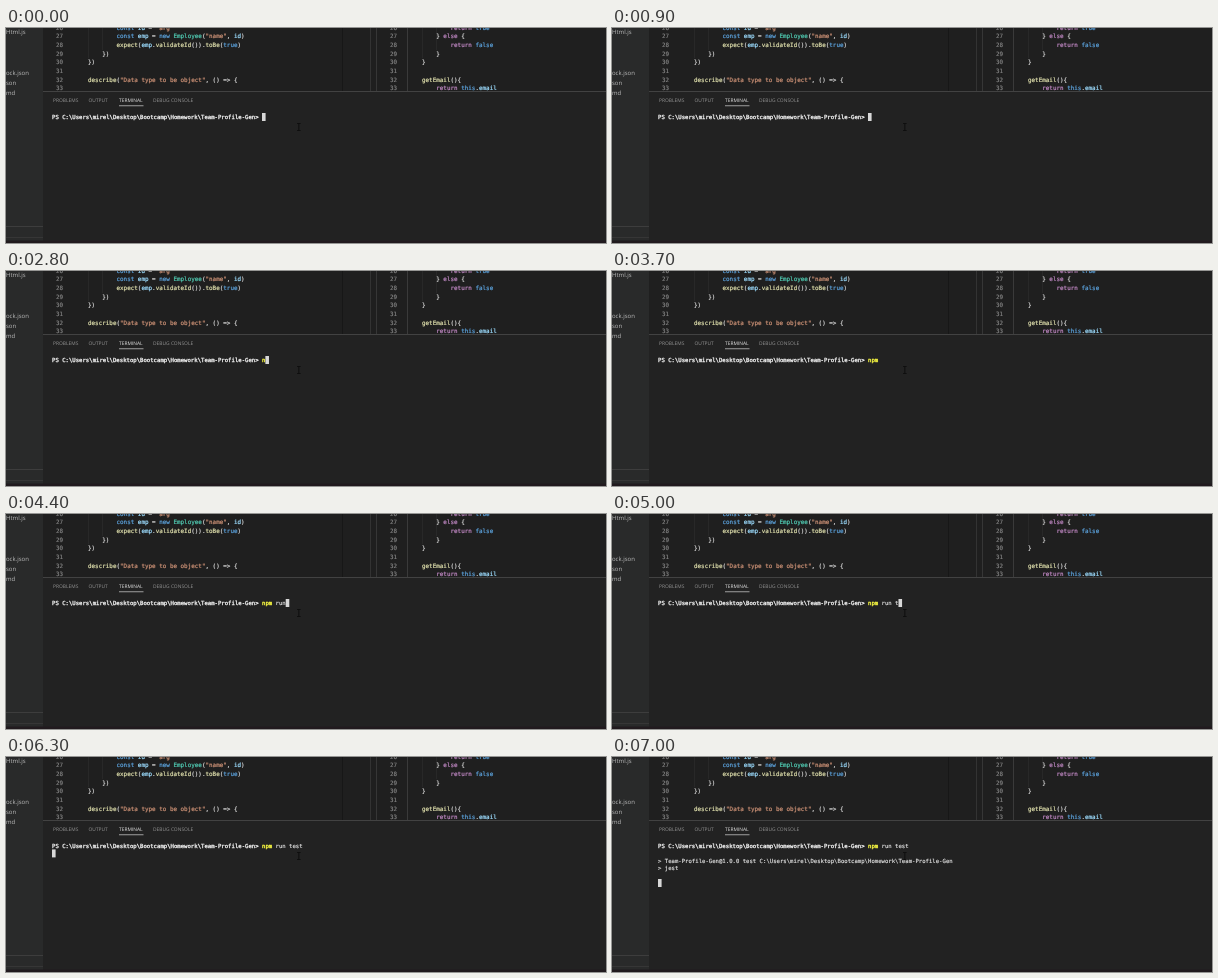
Write an HTML page with a canvas that moves like this. It is 600 px wide and 215 px high and loops after 8000 ms.

```html
<!DOCTYPE html>
<html lang="en">
<head>
<meta charset="utf-8">
<title>Terminal test run</title>
<style>
html, body { margin: 0; width: 100%; height: 100%; overflow: hidden; background: #222; }
canvas { display: block; }
</style>
</head>
<body>
<canvas id="stage" width="600" height="215"></canvas>
<script>
const ctx = document.getElementById('stage').getContext('2d');
const MONO = '"DejaVu Sans Mono", monospace';
const SANS = '"Open Sans", sans-serif';
const LOOP = 8000;
const PATH = 'C:\\Users\\mirel\\Desktop\\Bootcamp\\Homework\\Team-Profile-Gen';
const PROMPT = `PS ${PATH}> `;
const COMMAND = 'npm run test';
const KEY_TIMES = [2800, 3100, 3400, 3700, 4000, 4200, 4400, 4600, 4900, 5100, 5300, 5400];
const ENTER = 6000, OUTPUT = 7000;
const CELL = 3.387, ROW = 7.4, LEFT = 46, TOP = 89;
const CODE_CELL = 3.56, CODE_ROW = 8.65;

function rect(x, y, w, h, color) {
  ctx.fillStyle = color;
  ctx.fillRect(x, y, w, h);
}

// Glyphs are set ten times larger and scaled down for fractional positions.
function text(str, x, y, size, color, family = SANS, weight = 0) {
  ctx.save();
  ctx.translate(x, y);
  ctx.scale(0.1, 0.1);
  ctx.font = `${size * 10}px ${family}`;
  ctx.textRendering = 'geometricPrecision';
  ctx.fillStyle = ctx.strokeStyle = color;
  ctx.fillText(str, 0, size * 3.6);
  if (weight) {
    ctx.lineWidth = weight * 10;
    ctx.lineJoin = 'round';
    ctx.strokeText(str, 0, size * 3.6);
  }
  ctx.restore();
}

function mono(str, x, y, cell, color, weight) {
  [...str].forEach((ch, i) => {
    if (ch !== ' ') text(ch, x + i * cell, y, cell / 0.602, color, MONO, weight);
  });
}

function tokenColor(token, next) {
  if (token[0] === '"') return '#c98f74';
  if (/^(return|else)$/.test(token)) return '#bd86c0';
  if (/^(const|new|true|false|this)$/.test(token)) return '#5a9fd8';
  if (token === 'Employee') return '#4fc8b0';
  if (!/\w/.test(token)) return '#d0d0d0';
  return next === '(' ? '#dcdcaa' : '#9cdcfe';
}

function code(line, indent, str, left) {
  const y = 8.3 + (line - 27) * CODE_ROW;
  for (const m of str.matchAll(/"[^"]*"|\w+|[^\w\s"]+/g)) {
    const color = tokenColor(m[0], str[m.index + m[0].length]);
    mono(m[0], left + (indent + m.index) * CODE_CELL, y, CODE_CELL, color, 0.22);
  }
}

function drawEditor() {
  rect(37, 0, 563, 63, '#1f1f1f');
  rect(336, 0, 1, 63, '#171717');
  rect(364, 0, 1, 63, '#333');
  rect(370, 0, 1, 63, '#363636');
  rect(401, 0, 1, 63, '#3a3a3a');
  for (const [x, h] of [[82, 30], [96, 22], [416, 30], [430, 22]]) rect(x, 0, 0.5, h, '#333');
  for (let n = 26; n <= 33; n++) {
    const y = 8.3 + (n - 27) * CODE_ROW;
    for (const x of [50, 384]) mono(String(n), x, y, CODE_CELL, '#868686', 0.15);
  }
  code(26, 8, 'const id = "arg"', 82);
  code(27, 8, 'const emp = new Employee("name", id)', 82);
  code(28, 8, 'expect(emp.validateId()).toBe(true)', 82);
  code(29, 4, '})', 82);
  code(30, 0, '})', 82);
  code(32, 0, 'describe("Data type to be object", () => {', 82);
  code(26, 8, 'return true', 416);
  code(27, 4, '} else {', 416);
  code(28, 8, 'return false', 416);
  code(29, 4, '}', 416);
  code(30, 0, '}', 416);
  code(32, 0, 'getEmail(){', 416);
  code(33, 4, 'return this.email', 416);
}

function drawSidebar() {
  rect(0, 0, 37, 215, '#292a2a');
  text('Html.js', 0, 4, 6, '#bcbcbc');
  text('ock.json', 0, 45, 6, '#bcbcbc');
  text('son', 0, 55, 6, '#bcbcbc');
  text('md', 0, 65, 6, '#bcbcbc');
  rect(0, 198, 37, 0.8, '#434343');
  rect(0, 209, 37, 0.8, '#3a3a3a');
}

function drawPanel() {
  rect(37, 63, 563, 152, '#222');
  rect(37, 63, 563, 1, '#424242');
  for (const [label, x] of [['PROBLEMS', 47], ['OUTPUT', 82.5], ['TERMINAL', 113], ['DEBUG CONSOLE', 147]]) {
    text(label, x, 72.2, 4.9, label === 'TERMINAL' ? '#e6e6e6' : '#959595');
  }
  rect(113, 77.4, 24.5, 0.8, '#bdbdbd');
}

function terminal(str, col, row, color = '#e4e4e4', weight = 0.15) {
  mono(str, LEFT + col * CELL, TOP + row * ROW, CELL, color, weight);
}

function cursor(col, row) {
  rect(LEFT + col * CELL, TOP + row * ROW - 4, 3.6, 8, '#d8d8d8');
}

function drawTerminal(t) {
  const typed = COMMAND.slice(0, KEY_TIMES.filter(k => t >= k).length);
  terminal(PROMPT, 0, 0, '#ececec', 0.35);
  terminal(typed.slice(0, 3), PROMPT.length, 0, '#f4f440', 0.4);
  terminal(typed.slice(3), PROMPT.length + 3, 0);
  if (t >= OUTPUT) {
    terminal(`> Team-Profile-Gen@1.0.0 test ${PATH}`, 0, 2);
    terminal('> jest', 0, 3);
    cursor(0, 5);
  } else if (t >= ENTER) {
    cursor(0, 1);
  } else if (t < 3700 || t >= 3800) {
    cursor(PROMPT.length + typed.length, 0);
  }
}

function drawPointer() {
  rect(292.4, 95.5, 0.9, 7, '#0c0c0c');
  rect(291, 95, 3.6, 0.8, '#0c0c0c');
  rect(291, 102.2, 3.6, 0.8, '#0c0c0c');
}

function frame(now) {
  drawEditor();
  drawPanel();
  drawSidebar();
  drawTerminal(now % LOOP);
  drawPointer();
  rect(0, 212.5, 600, 2.5, '#211a1e');
  requestAnimationFrame(frame);
}
requestAnimationFrame(frame);
</script>
</body>
</html>
```
